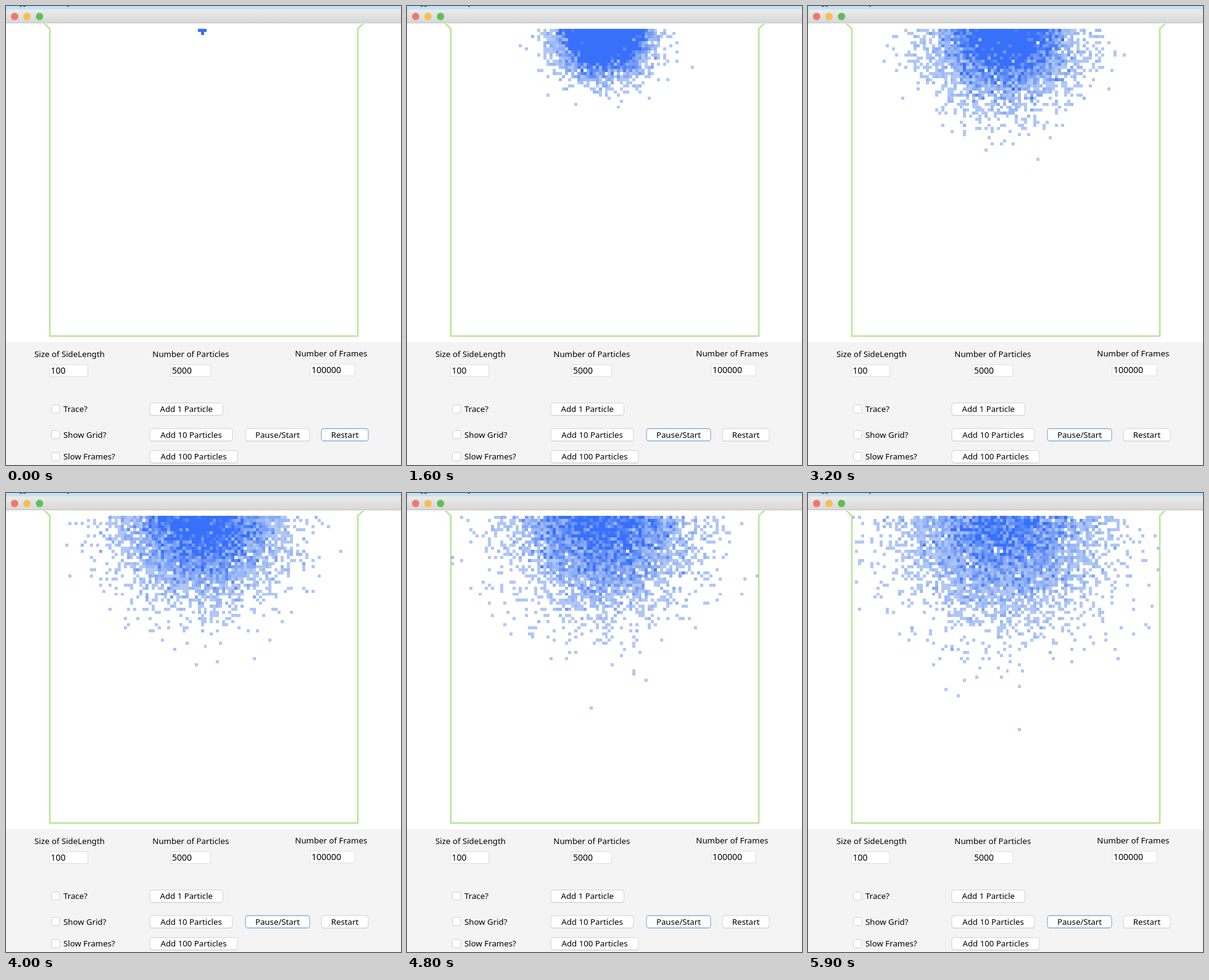
Animation, 640 px wide and 744 px high, one loop 6000 ms. Source, as an HTML page with a canvas:

```html
<!DOCTYPE html>
<html lang="en">
<head>
<meta charset="utf-8">
<title>Particle diffusion</title>
<style>
  html, body { margin: 0; width: 100%; height: 100%; overflow: hidden; background: #fff; }
  svg, canvas { position: absolute; left: 0; top: 0; display: block; }
  text { font: 13.25px "Noto Sans", "Open Sans", sans-serif; fill: #000; }
  text.value { font-size: 14px; }
  .button { fill: #fff; stroke: #d2d2d2; }
  .button.focus { stroke: #8db2da; stroke-width: 1.3; }
  .check { fill: #fff; stroke: #cfcfcf; }
  .field { fill: #fff; stroke: #e0e0e0; }
</style>
</head>
<body>
<svg id="ui" width="640" height="744" viewBox="0 0 640 744">
  <defs>
    <linearGradient id="bar" x2="0" y2="1">
      <stop offset="0" stop-color="#ececec"/>
      <stop offset="1" stop-color="#d6d6d6"/>
    </linearGradient>
  </defs>
  <rect width="640" height="744" fill="#fff"/>
  <rect width="640" height="12" fill="#bfe2f6"/>
  <path d="M22 0h4v1h-4zM28 0h4v1h-4zM99 0h3v1h-3z" fill="#26343f"/>
  <path d="M0 28V10Q0 5.5 5 5.5H640V28z" fill="url(#bar)"/>
  <path d="M0 27.5H640" stroke="#c4c4c4"/>
  <circle cx="14" cy="17" r="6" fill="#ee796c"/>
  <circle cx="34" cy="17" r="6" fill="#f5bf50"/>
  <circle cx="54.3" cy="17" r="6" fill="#5ebf58"/>
  <g fill="none">
    <path d="M62 28L71 37V535H570V37L579 28" stroke="#edfae3" stroke-width="4.5"/>
    <path d="M62 28L71 37V535H570V37L579 28" stroke="#a4dd84" stroke-width="1.5"/>
  </g>
  <rect y="545" width="640" height="199" fill="#f4f4f4"/>
</svg>
<canvas id="stage" width="640" height="744"></canvas>
<script>
const LOOP = 6000, TICK = 100;
const START = 500, FOCUS_AT = 500, STEPS_PER_MS = 0.09;
const SIZE = 100, COUNT = 5000;
const PALE = [176, 199, 246], FULL = [56, 112, 250], FULL_COUNT = 7;

const ui = document.getElementById('ui');
const ctx = document.getElementById('stage').getContext('2d');

function add(tag, attrs, text = '') {
  const el = document.createElementNS('http://www.w3.org/2000/svg', tag);
  for (const key in attrs) el.setAttribute(key, attrs[key]);
  el.textContent = text;
  ui.append(el);
  return el;
}

function label(x, y, text, more = {}) {
  return add('text', { x, y, ...more }, text);
}

function box(cls, x, y, width, height, rx) {
  return add('rect', { class: cls, x, y, width, height, rx });
}

function button(x, y, width, text) {
  box('', x, y + 1, width, 20, 4).setAttribute('fill', '#dcdcdc');
  const el = box('button', x, y, width, 20, 4);
  label(x + width / 2, y + 14.5, text, { 'text-anchor': 'middle' });
  return el;
}

function field(x, y, width, title, titleX, value) {
  label(titleX, y - 13, title, { 'text-anchor': 'middle' });
  box('field', x, y, width, 19, 0);
  label(x + 2, y + 14.5, value, { class: 'value' });
}

field(70.5, 581.5, 62, 'Size of SideLength', 103, '100');
field(267, 581.5, 64.5, 'Number of Particles', 299.3, '5000');
field(493, 580.5, 72, 'Number of Frames', 526.8, '100000');

[['Trace?', 646.5], ['Show Grid?', 688], ['Slow Frames?', 723.5]].forEach(([text, y]) => {
  box('check', 73.5, y, 13.5, 13.5, 3);
  label(93, y + 11.7, text);
});

button(233, 643.5, 118.5, 'Add 1 Particle');
button(233, 685, 134, 'Add 10 Particles');
button(233, 720.5, 142, 'Add 100 Particles');
const pause = button(388, 685, 104, 'Pause/Start');
const restart = button(511, 685, 76, 'Restart');

function seeded(seed) {
  return () => {
    seed = (seed + 0x6D2B79F5) | 0;
    let n = Math.imul(seed ^ (seed >>> 15), 1 | seed);
    n = (n + Math.imul(n ^ (n >>> 7), 61 | n)) ^ n;
    return ((n ^ (n >>> 14)) >>> 0) / 4294967296;
  };
}

// Random walk from the top middle; a move into a wall is lost.
function simulate() {
  const random = seeded(41);
  const xs = new Int8Array(COUNT).fill(49), ys = new Int8Array(COUNT);
  const clamp = v => Math.max(0, Math.min(SIZE - 1, v));
  const shots = [];
  let done = 0;
  for (let t = 0; t < LOOP; t += TICK) {
    const goal = 1 + Math.round(Math.max(0, t - START) * STEPS_PER_MS);
    for (; done < goal; done++) {
      for (let i = 0; i < COUNT; i++) {
        const dir = Math.floor(random() * 4), d = dir & 1 ? 1 : -1;
        if (dir < 2) xs[i] = clamp(xs[i] + d);
        else ys[i] = clamp(ys[i] + d);
      }
    }
    const cells = new Uint16Array(SIZE * SIZE);
    for (let i = 0; i < COUNT; i++) cells[ys[i] * SIZE + xs[i]]++;
    shots.push(cells);
  }
  return shots;
}

// Crowded cells are deeper blue.
function shade(n) {
  const k = Math.min(1, (n - 1) / (FULL_COUNT - 1));
  return `rgb(${PALE.map((c, i) => Math.round(c + (FULL[i] - c) * k))})`;
}

const shots = simulate();
const left = col => Math.round(71 + col * 4.99);
const upper = row => Math.round(37 + row * 4.98);
let shown = -1;

function draw(index) {
  const cells = shots[index];
  ctx.clearRect(0, 0, 640, 744);
  for (let row = 0; row < SIZE; row++) {
    const y = upper(row), h = upper(row + 1) - y;
    for (let col = 0; col < SIZE; col++) {
      const n = cells[row * SIZE + col];
      if (!n) continue;
      const x = left(col);
      ctx.fillStyle = shade(n);
      ctx.fillRect(x, y, left(col + 1) - x, h);
    }
  }
  const running = index * TICK >= FOCUS_AT;
  pause.classList.toggle('focus', running);
  restart.classList.toggle('focus', !running);
}

const began = performance.now();
function frame() {
  const t = Math.max(0, performance.now() - began) % LOOP;
  const index = Math.floor(t / TICK);
  if (index !== shown) draw(shown = index);
  requestAnimationFrame(frame);
}
frame();
</script>
</body>
</html>
```
